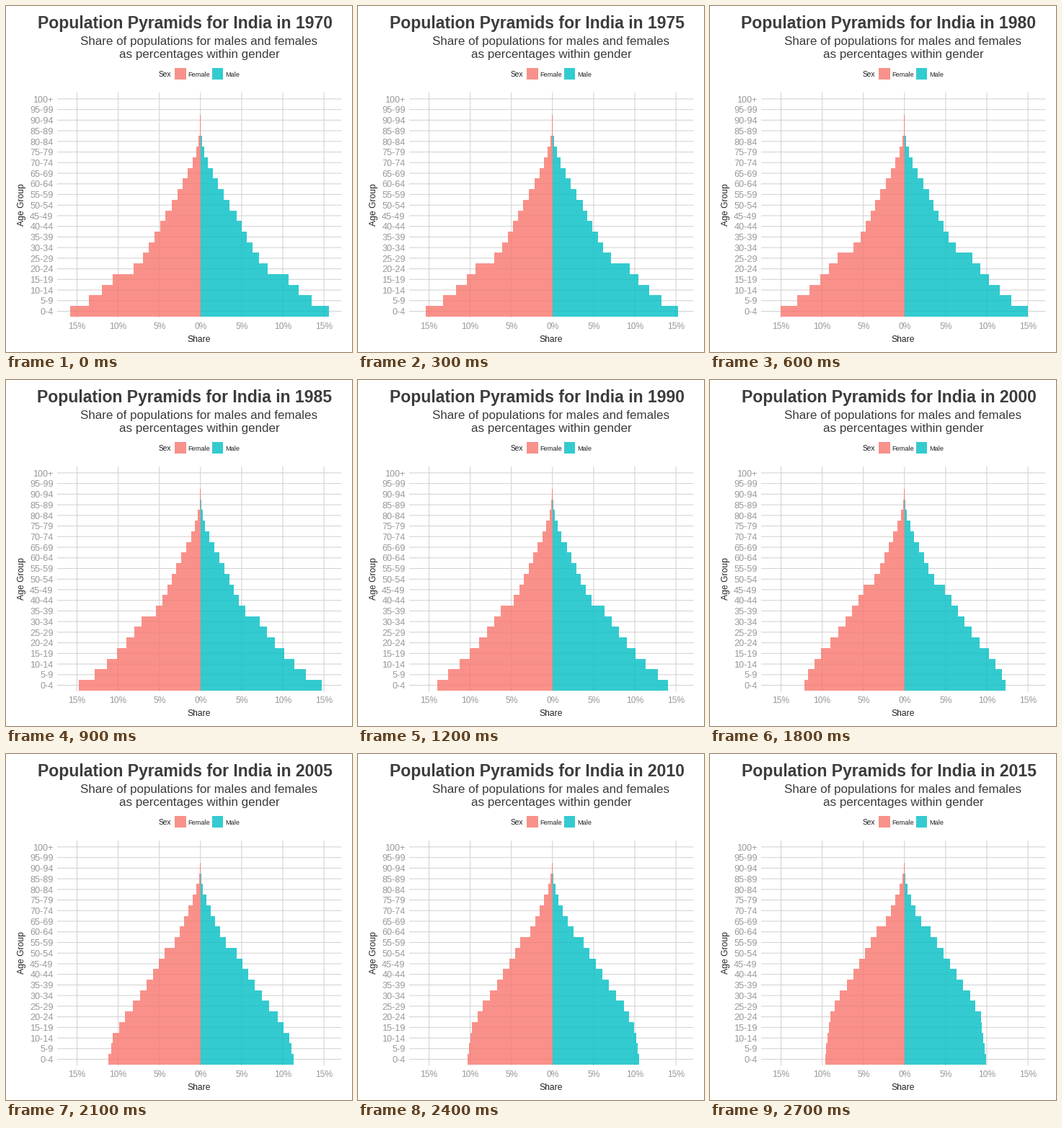
A matplotlib script that plays this animation: 480x480 px, repeating every 3 s.

```python
import matplotlib.pyplot as plt
import numpy as np
from matplotlib.animation import FuncAnimation
from matplotlib.patches import Rectangle

SIZE, DPI = 480, 100
PX = 72 / DPI
FEMALE, MALE = "#F8766D", "#00BFC4"
DARK, INK, GREY, GRID = "#3C3C3C", "#222222", "#999999", "#D3D3D3"
ZERO_X, STEP_X = 269.8, 57.1  # one step is 5 percent
BASE_Y, STEP_Y = 423.5, 14.73
LEFT, RIGHT = 71, 465.5
BOTTOM, TOP = BASE_Y + 0.6 * STEP_Y, BASE_Y - 20.6 * STEP_Y
FULL_SHARE = 20 * STEP_X
PERIODS = 10
AGES = np.arange(19)

# Log size of the five-year birth cohorts, counted from the 1970 newborns:
# steady growth, a jump after 1950, levelling off from 1985.
COHORTS = [-16, -13, -9, -5, -4, -3, 3, 5, 9]
LOG_BIRTHS = [1.75, 2.45, 3.09, 3.5, 3.633, 3.9, 4.53, 4.66, 4.718]


def bar_lengths(period, female):
    """Share of each age group in pixels: births times survival, summing to 100%."""
    progress = period / (PERIODS - 1)
    births = np.interp(period - AGES, COHORTS, LOG_BIRTHS)
    hazard = 0.00144 * np.expm1(0.45 * AGES)  # Gompertz mortality
    infants = 0.065 * (1 - progress) * np.exp(-AGES)
    lag = 0.004 * AGES * np.sin(np.pi * progress)
    if female:
        hazard *= 0.9 - 0.2 * progress
        lag += 0.004 * AGES * (1 - progress)
    people = np.exp(births - hazard + infants - lag)
    hairline = 0.6 if female else 0
    return np.maximum(FULL_SHARE * people / people.sum(), hairline)


fig = plt.figure(figsize=(SIZE / DPI, SIZE / DPI), dpi=DPI, facecolor="white")
ax = fig.add_axes([0, 0, 1, 1])
ax.set(xlim=(0, SIZE), ylim=(SIZE, 0))
ax.axis("off")


def label(x, y, text, size, color=INK, ha="center", **style):
    style.setdefault("va", "baseline")
    return ax.text(x, y, text, fontsize=size * PX, color=color, ha=ha,
                   family="Liberation Sans", **style)


def box(x, y, width, height, color):
    return ax.add_patch(Rectangle((x, y), width, height, facecolor=color,
                                  alpha=0.8, linewidth=0, zorder=2))


def grid_line(xs, ys):
    ax.plot(xs, ys, color=GRID, linewidth=1.07 * PX, zorder=1,
            solid_capstyle="butt", snap=False)


for i in range(21):
    y = BASE_Y - i * STEP_Y
    grid_line([LEFT, RIGHT], [y, y])
    name = "100+" if i == 20 else f"{5 * i}-{5 * i + 4}"
    label(65.5, y + 4.7, name, 12.6, GREY, "right")

for i in range(-3, 4):
    x = ZERO_X + i * STEP_X
    grid_line([x, x], [TOP, BOTTOM])
    label(x, 448.2, f"{abs(5 * i)}%", 12, GREY)

title = label(248, 31, "", 22.95, DARK, weight="bold")
label(268, 54, "Share of populations for males and females", 17, DARK)
label(268.5, 72, "as percentages within gender", 17, DARK)
label(268, 466, "Share", 12.1)
label(22.5, 276, "Age Group", 12.1, rotation=90, va="center")

label(212, 98.5, "Sex", 10.2, ha="left")
for x, name, color in ((234, "Female", FEMALE), (286, "Male", MALE)):
    box(x, 86, 16 if name == "Female" else 15, 16, color)
    label(x + 18, 98, name, 9.1, ha="left")

tops = BASE_Y - (AGES + 0.5) * STEP_Y
female_bars = [box(ZERO_X, y, 0, STEP_Y, FEMALE) for y in tops]
male_bars = [box(ZERO_X, y, 0, STEP_Y, MALE) for y in tops]


def draw(period):
    title.set_text(f"Population Pyramids for India in {1970 + 5 * period}")
    for bar, length in zip(female_bars, bar_lengths(period, True)):
        bar.set_x(ZERO_X - length)
        bar.set_width(length)
    for bar, length in zip(male_bars, bar_lengths(period, False)):
        bar.set_width(length)
    return [title, *female_bars, *male_bars]


animation = FuncAnimation(fig, draw, frames=PERIODS, interval=300, repeat=True)
plt.show()
```
